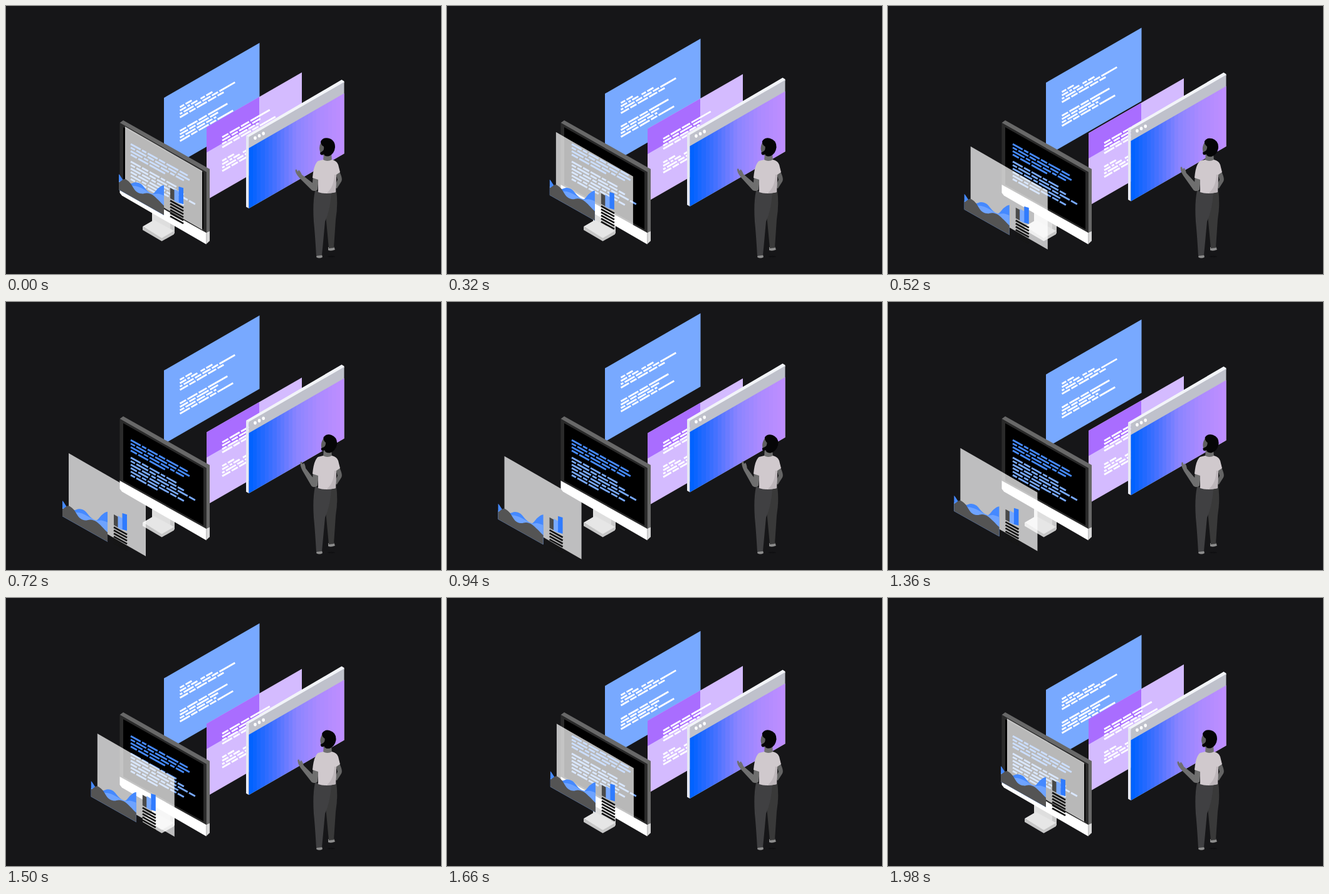
An HTML page that plays this animation: 694 px wide and 429 px high, repeating every 2.02 s.

```html
<!DOCTYPE html>
<html lang="en">
<head>
<meta charset="utf-8">
<title>Layered screens</title>
<style>
html, body { margin: 0; width: 100%; height: 100%; overflow: hidden; background: #161618; }
svg { display: block; width: 694px; height: 429px; }
</style>
</head>
<body>
<svg id="stage" viewBox="0 0 694 429">
  <defs><linearGradient id="sweep"></linearGradient></defs>
</svg>
<script>
const NS = 'http://www.w3.org/2000/svg';
const stage = document.getElementById('stage');
const ISO = 0.577;

function add(parent, tag, attrs = {}) {
  const el = document.createElementNS(NS, tag);
  for (const key in attrs) el.setAttribute(key, attrs[key]);
  parent.appendChild(el);
  return el;
}
const group = (parent = stage) => add(parent, 'g');
const poly = (parent, points, fill, opacity = 1) =>
  add(parent, 'polygon', { points, fill, 'fill-opacity': opacity });
const path = (parent, d, fill, opacity = 1) =>
  add(parent, 'path', { d, fill, 'fill-opacity': opacity });

// Upright parallelogram: left edge at x, top slanting by slope
function pane(parent, x, y, w, h, slope, fill, opacity) {
  const dy = w * slope;
  return poly(parent, `${x},${y} ${x + w},${y + dy} ${x + w},${y + dy + h} ${x},${y + h}`, fill, opacity);
}

// Rows of dashes; each run of # becomes one slanted stroke
function dashes(parent, x, y, slope, rows, color, unit = 3, gap = 5.4, width = 2.8) {
  let d = '';
  rows.forEach((row, i) => {
    for (const run of row.matchAll(/#+/g)) {
      const a = run.index * unit, b = a + run[0].length * unit + 0.8;
      const top = y + i * gap;
      d += `M${x + a} ${top + a * slope}L${x + b} ${top + b * slope}`;
    }
  });
  add(parent, 'path', { d, stroke: color, 'stroke-width': width, fill: 'none' });
}

const shortText = ['## ###', '### # ###  ## ###', '# ##### ### #### ### ########', '#### ### ##### #### ###'];
const longText = ['### ##### #### ##########', '#### ### ###### ####', '## ##### #### ### #', '##### ### ##### ### ########'];

// Back panel
const blue = group();
pane(blue, 252, 147, 152.5, 117.5, -ISO, '#78a9ff');
dashes(blue, 277.5, 162, -ISO, shortText, '#fff');
dashes(blue, 277.5, 200, -ISO, longText, '#fff');

// Middle panel
const purple = group();
pane(purple, 320, 194, 152, 116.5, -ISO, '#d4bbff');
pane(purple, 320, 194, 84, 40.5, -ISO, '#a96dff');
dashes(purple, 345, 210, -ISO, longText, '#fff');
dashes(purple, 345, 248, -ISO, shortText, '#fff');

// Browser window with a banded gradient
const sweep = document.getElementById('sweep');
const tones = [[0, 98, 255], [66, 112, 255], [138, 132, 255], [172, 138, 255], [190, 142, 255]];
const bands = 24, spans = tones.length - 1;
for (let i = 0; i < bands; i++) {
  const at = i / (bands - 1) * spans, k = Math.min(spans - 1, Math.floor(at));
  const rgb = tones[k].map((c, j) => Math.round(c + (tones[k + 1][j] - c) * (at - k)));
  for (const edge of [i, i + 1])
    add(sweep, 'stop', { offset: edge / bands, 'stop-color': `rgb(${rgb})` });
}
const browser = group();
poly(browser, '383,207.5 535.5,118 539.5,120.5 539.5,123 388,212', '#f2f4f8');
poly(browser, '383,207.5 387.5,210 387.5,324 383,321.5', '#e6e8f2');
pane(browser, 387.5, 209.5, 152, 114.5, -ISO, '#bfc1cb');
pane(browser, 387.5, 227.5, 152, 96.5, -ISO, 'url(#sweep)');
for (const i of [0, 1, 2])
  add(browser, 'ellipse', { cx: 397.5 + i * 6.6, cy: 211.3 - i * 3.6, rx: 2.3, ry: 2.8, fill: '#fff' });

// Monitor
const monitor = group();
poly(monitor, '233,328 264,345 269,350 269,364 249,372 233,352', '#c9c9c9');
poly(monitor, '233,328 262,344 262,362 233,346', '#dedede');
poly(monitor, '218,353 218,358.5 248.5,376.5 268,365.5 268,360 249,371', '#c6c6c6');
poly(monitor, '218,353 236,342.5 268,360 248.5,371.5', '#e6e6e6');
poly(monitor, '181.5,187 187,183 325,261 325,362 319.5,365 319.5,266', '#686868');
poly(monitor, '319.5,363 325,360.5 325,376 319.5,381', '#d8d8d8');
poly(monitor, '181.5,187 319.5,265.5 319.5,364 181.5,287', '#2a2a2a');
poly(monitor, '187,194 315,266.5 315,357.5 187,286', '#000');
poly(monitor, '181.5,286 319.5,363 319.5,381.5 185,303.5 181.5,299', '#fff');
dashes(monitor, 199, 221, 0.555,
  ['##### ## ##### ### ###### ####', '## ##### ### ###### #### ######', '###### ## ##### #### ## ####', '### ##### ########'],
  '#4589ff', 3, 5.6);
dashes(monitor, 199, 249, 0.555,
  ['##### ### ##### ## #####', '## ###### ### ##### #### ###', '##### #### ## ###### ### ##### ###', '### ##### ##### ## ######', '##### ## ##### ##### ### ###', '## ##### #####'],
  '#78a9ff', 3, 5.6);

// Glass sheet with charts
const glass = group();
pane(glass, 190, 193, 123, 94, ISO, '#fff', 0.72);

function wave(heights, fill) {
  const step = 9, x0 = 180, y0 = 294, slope = 0.565;
  const end = heights.length - 1, width = end * step;
  const at = i => {
    const k = Math.max(0, Math.min(end, i));
    return [x0 + i * step, y0 + i * step * slope - heights[k]];
  };
  let d = `M${x0} ${y0}L${at(0)}`;
  for (let i = 0; i < end; i++) {
    const [a, b, c, e] = [at(i - 1), at(i), at(i + 1), at(i + 2)];
    d += `C${b.map((v, j) => v + (c[j] - a[j]) / 6)} ${c.map((v, j) => v - (e[j] - b[j]) / 6)} ${c}`;
  }
  path(glass, `${d}L${x0 + width} ${y0 + width * slope}Z`, fill);
}
wave([25, 18, 20, 27, 29, 24, 24, 38, 48], '#4589ff');
wave([14, 14, 17, 21, 23, 23, 24, 29, 31], '#6ea3ff');
wave([12, 22, 21, 13, 14, 20, 22, 19, 15], '#545454');

pane(glass, 262, 291, 7, 17, 0.55, '#4a4a4a');
pane(glass, 268.5, 293, 7, 19, 0.55, '#78a9ff');
pane(glass, 275.5, 289, 7.5, 26, 0.3, '#2f7bff');
dashes(glass, 262, 311.5, 0.55, Array(6).fill('#######'), '#161616', 2.9, 5, 2.7);

// Figure
const man = group();
add(man, 'ellipse', { cx: 519, cy: 401, rx: 6, ry: 1.2, fill: '#101012' });
path(man, 'M514 386L523 385L525 390Q519 393 514 391Z', '#8d8d8d');
path(man, 'M496 398L504 398L505 402Q500 405 495 402Z', '#8d8d8d');
path(man, 'M505 296L527 295Q530 318 526 342L523 387L515 388L511 345Z', '#393939');
path(man, 'M493 296L519 297Q518 325 509 345L504 399L495 400Q493 365 491 345Q489 315 493 296Z', '#404042');
path(man, 'M530 261Q538 276 535 281L528 292L523 290L529 278L525 266Z', '#646464');
path(man, 'M507 234L519 234L520 249Q512 254 506 248Z', '#6f6f6f');

const forearm = group(man);
path(forearm, 'M495 291Q495 298 488 295L468 275Q461 267 461.5 262L463.5 261.5L465.5 265L467 262.5Q469.5 264 472 270L490 284Z', '#6f6f6f');
path(man, 'M490 273L499 276L497 294Q493 299 488 292Z', '#6f6f6f');
path(man, 'M506 246Q513 250 520 246Q528 248 530 254L533 266L527 270L526 298Q511 302 498 298L498 278L489 275Q491 253 498 248Z', '#d0c9cd');
path(man, 'M527 270L526 298Q519 300 512 299Q523 290 524 270Z', '#bdb6ba');

const head = group(man);
path(head, 'M503 217Q499 225 500.5 231L502 237L509 240L517 232L512 216Z', '#5f5f5f');
path(head, 'M502 217Q505 210 514 211.5Q525 214 525 226Q524 236 516 240Q509 242 507 237Q502 241 501 235L504 233Q508 231 507 225Q502 222 502 217Z', '#050506');

// Motion: out until TURN, then back; symmetric cubic-bezier(.6, 0, .4, 1)
const LOOP = 2020, TURN = 970, HOME = 1990;

function ease(u) {
  let lo = 0, hi = 1;
  for (let i = 0; i < 24; i++) {
    const s = (lo + hi) / 2;
    if (1.8 * s - 2.4 * s * s + 1.6 * s * s * s < u) lo = s; else hi = s;
  }
  return lo * lo * (3 - 2 * lo);
}
function progress(t) {
  if (t < TURN) return ease(t / TURN);
  return t < HOME ? 1 - ease((t - TURN) / (HOME - TURN)) : 0;
}
const place = (el, value) => el.setAttribute('transform', value);

function draw(t) {
  const p = progress(t);
  place(blue, `translate(0 ${-41 * p})`);
  place(purple, `translate(0 ${16 * p})`);
  place(browser, `translate(0 ${-19.5 * p})`);
  place(glass, `translate(${-98.5 * p} ${53.7 * p})`);
  place(forearm, `rotate(${16 * p} 490 292)`);
  place(head, `translate(0 ${p}) rotate(${10 * p} 513 245)`);
}

const start = performance.now();
function tick() {
  draw((performance.now() - start) % LOOP);
  requestAnimationFrame(tick);
}
draw(0);
requestAnimationFrame(tick);
</script>
</body>
</html>
```
